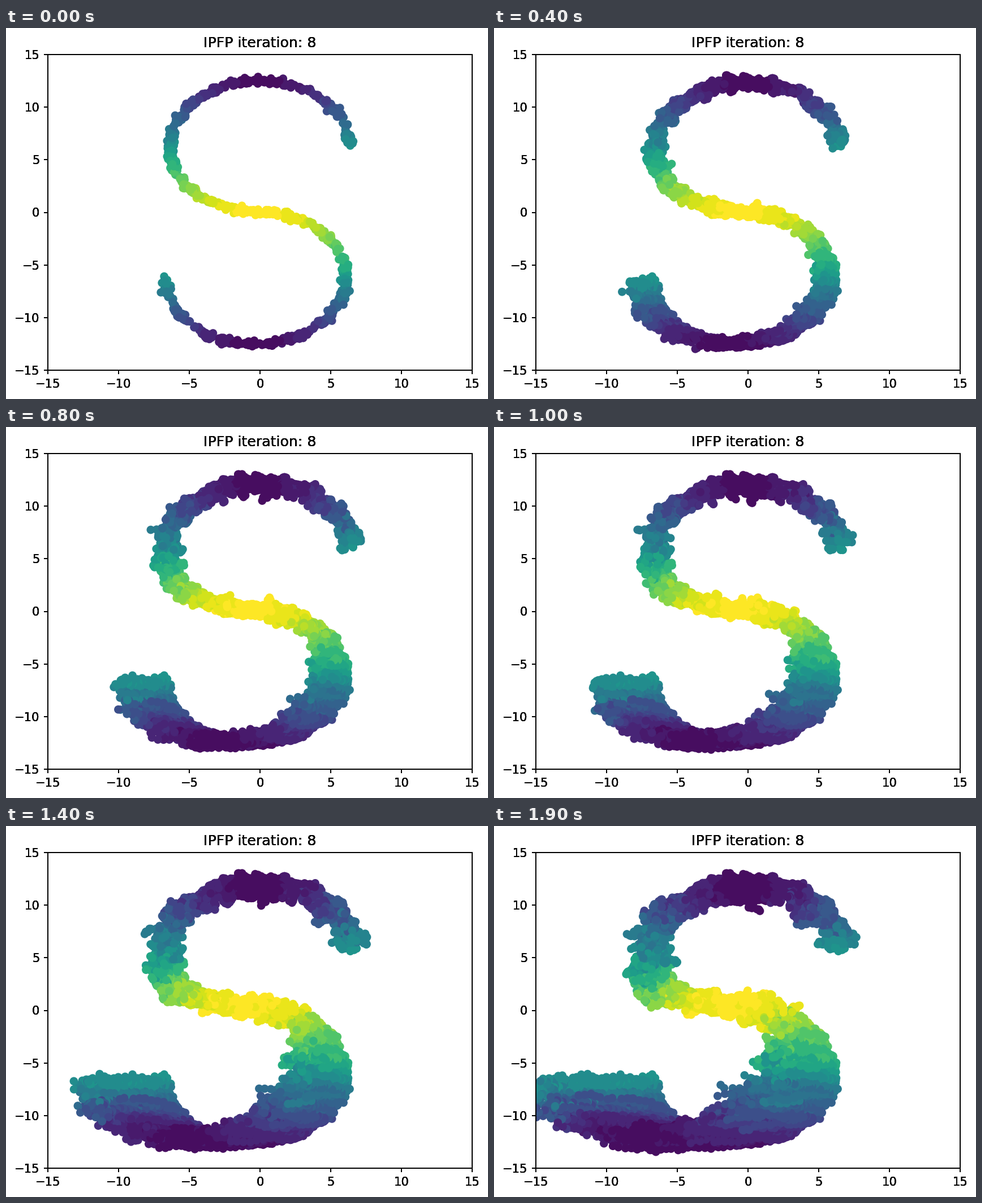
Animation of 852 by 657 pixels, one loop 2000 ms. Source, as a matplotlib script:

```python
import numpy as np
import matplotlib.pyplot as plt
from matplotlib.animation import FuncAnimation

W, H, DPI = 852, 657, 150
STEPS, POINTS = 20, 800
LEVELS = 29
NOISE = 0.14

plt.rcParams.update({"font.family": "DejaVu Sans", "font.size": 10.08})
rng = np.random.default_rng(8)


def s_curve(n):
    """Points on an S and the colour that goes with each."""
    t = 3 * np.pi * (rng.random(n) - 0.5)
    xy = 6.3 * np.column_stack([np.sin(t), np.sign(t) * (np.cos(t) - 1)])
    xy += 0.06 * rng.standard_normal(xy.shape)
    shade = 0.035 + 0.965 * (np.cos(t) + 1) / 2
    return xy, plt.get_cmap("viridis")(np.round(shade * LEVELS) / LEVELS)


def drift(xy):
    """Strong pull to the left below zero, slow sinking above it."""
    x, y = xy.T
    low, high = np.minimum(y, 0), np.maximum(y, 0)
    pull = 0.35 * (1 - np.exp(low / 6))
    vx = (0.0035 * high - 0.05) * (1 - 0.1 * x) - pull * (1 - 0.02 * x)

    left = np.clip(y / 3, 0, 1) * np.clip((9 - y) / 3, 0, 1) / (1 + np.exp(2 * (x + 4)))
    sink = -0.09 * np.clip((y - 7) / 5, 0, 1) - 0.1 * left
    tail = np.clip((-x - 4) / 6, 0, 1)
    gather = 0.03 * (1 - tail) - 0.012 * (y + 8) * tail
    vy = np.where(y < 1, gather, sink)
    return np.column_stack([vx, vy])


def walk(xy):
    path = []
    for _ in range(STEPS):
        xy = xy + drift(xy) + NOISE * rng.standard_normal(xy.shape)
        path.append(xy)
    return np.concatenate(path)


start, colors = s_curve(POINTS)
trail = walk(start)
trail_colors = np.tile(colors, (STEPS, 1))

fig = plt.figure(figsize=(W / DPI, H / DPI), dpi=DPI, facecolor="white")
rect = [74 / W, 51 / H, 750 / W, 559 / H]


def make_axes(layer):
    ax = fig.add_axes(rect, label=f"layer {layer}", facecolor="none")
    ax.set(xlim=(-15, 15), ylim=(-15, 15))
    ax.set_xticks(range(-15, 16, 5))
    ax.set_yticks(range(-15, 16, 5))
    ax.tick_params(width=0.96)
    for spine in ax.spines.values():
        spine.set_linewidth(0.96)
    ax.set_title("IPFP iteration: 8")
    return ax


# Stacked frames give the dense black of the text and lines.
layers = [make_axes(i) for i in range(4)]
dots = layers[0].scatter([], [], s=36.6)


def draw(i):
    n = (i + 1) * POINTS
    dots.set_offsets(trail[:n])
    dots.set_facecolor(trail_colors[:n])
    dots.set_edgecolor(trail_colors[:n])
    return [dots]


anim = FuncAnimation(fig, draw, frames=STEPS, interval=100,
                     init_func=lambda: draw(0), repeat=True, repeat_delay=0)
plt.show()
```
